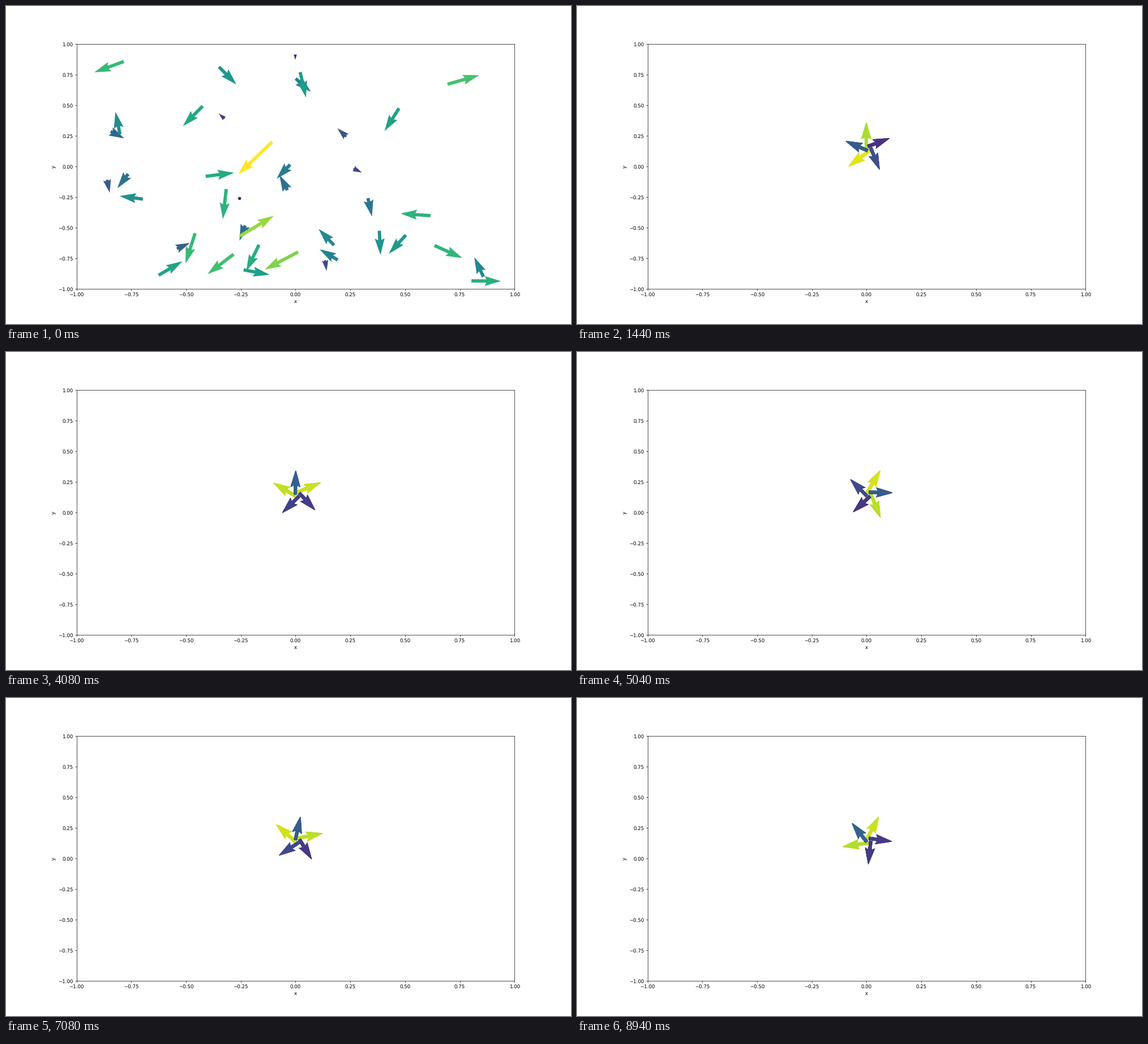
A matplotlib script that plays this animation: 998 px wide and 561 px high, repeating every 9 s.

```python
import numpy as np
import matplotlib.pyplot as plt
from matplotlib.animation import FuncAnimation

plt.rcParams["text.hinting"] = "none"

W, H, DPI = 998, 561, 62.375
FRAMES, INTERVAL = 150, 60
COUNT = 41

# The longest starting arrows: tail x, y and tip x, y in pixels.
LEADERS = np.array([
    (470, 240, 410, 297), (413, 406, 473, 370), (516, 434, 457, 465),
    (780, 138, 836, 122), (402, 438, 356, 473), (208, 98, 156, 117),
    (389, 323, 383, 376), (334, 401, 317, 454)], float)

CENTER = np.array([515, 251.5])
ORBIT = 4.0
START, TURN = 291.5, 129.373      # first heading, degrees per frame
DECAY, SETTLE = 0.76, 17

# Five groups, from the bottom layer to the top one.
OFFSETS = np.array([60.4, -66.8, 0.0, -224.3, -135.9])
LENGTHS = np.array([46.9, 45.8, 42.2, 41.8, 41.1])
SHADES = np.array([0.91, 0.87, 0.33, 0.21, 0.13])

GROUP = np.arange(COUNT) * 5 // COUNT
rng = np.random.default_rng(4)
is_top = np.append(np.diff(GROUP) > 0, True)
WOBBLE = np.where(is_top, 0, rng.uniform(-1, 1, COUNT))
TINT = np.where(is_top, 0, rng.uniform(-0.12, 0.12, COUNT))


def polar(length, degrees):
    a = np.radians(degrees)
    return np.column_stack([length * np.cos(a), length * np.sin(a)])


def to_data(px):
    x = (px[:, 0] / W - 0.125) / 0.775 * 2 - 1
    y = 1 - (px[:, 1] / H - 0.12) / 0.77 * 2
    return np.column_stack([x, y])


def by_length(vec):
    size = np.hypot(*vec.T)
    return (size - size.min()) / np.ptp(size)


def scatter():
    """Random starting tails (y down) and velocities (y up), leaders on top."""
    rest = COUNT - len(LEADERS)
    spots = np.column_stack([rng.uniform(130, 893, rest),
                             rng.uniform(82, 490, rest)])
    moves = polar(np.linspace(0, 54, rest) ** 0.5 * 54 ** 0.5,
                  rng.uniform(0, 360, rest))
    tails = np.vstack([spots, LEADERS[:, :2]])
    lead = (LEADERS[:, 2:] - LEADERS[:, :2]) * [1, -1]
    return tails, np.vstack([moves, lead])


TAILS, VELOCITIES = scatter()


def state(n):
    """Tails in pixels, arrow vectors and colour values at step n."""
    if n == 0:
        return TAILS, VELOCITIES, by_length(VELOCITIES)
    t = min(n / SETTLE, 1)
    s = t * t * (3 - 2 * t)
    heading = START + TURN * n + OFFSETS[GROUP] + WOBBLE
    ring = polar(ORBIT, heading + 90) * [1, -1]
    gap = (TAILS - CENTER) * DECAY ** n
    tails = CENTER + gap * (1 - s * t ** 4) + s * ring

    pull = -gap * [1, -1]
    pull *= 43 / np.hypot(*pull.T).mean()
    free = pull + VELOCITIES * 0.5 ** n
    vec = (1 - s) * free + s * polar(LENGTHS[GROUP], heading)

    flicker = 0.05 * np.sin(2.4 * n + 2 * GROUP)
    shade = (1 - s) * by_length(vec) + s * (SHADES[GROUP] + TINT + flicker)
    return tails, vec, np.clip(shade, 0, 1)


fig, ax = plt.subplots(figsize=(W / DPI + 1e-9, H / DPI + 1e-9), dpi=DPI)
ax.set(xlim=(-1, 1), ylim=(-1, 1), xlabel="x", ylabel="y")
tails, vec, shade = state(0)
arrows = ax.quiver(*to_data(tails).T, *vec.T, shade, cmap="viridis",
                   scale=1, scale_units="dots", width=0.0075)
arrows.set_clim(0, 1)


def update(n):
    tails, vec, shade = state(n)
    arrows.set_offsets(to_data(tails))
    arrows.set_UVC(*vec.T, shade)
    return arrows,


anim = FuncAnimation(fig, update, frames=FRAMES, interval=INTERVAL, repeat=True)
plt.show()
```
